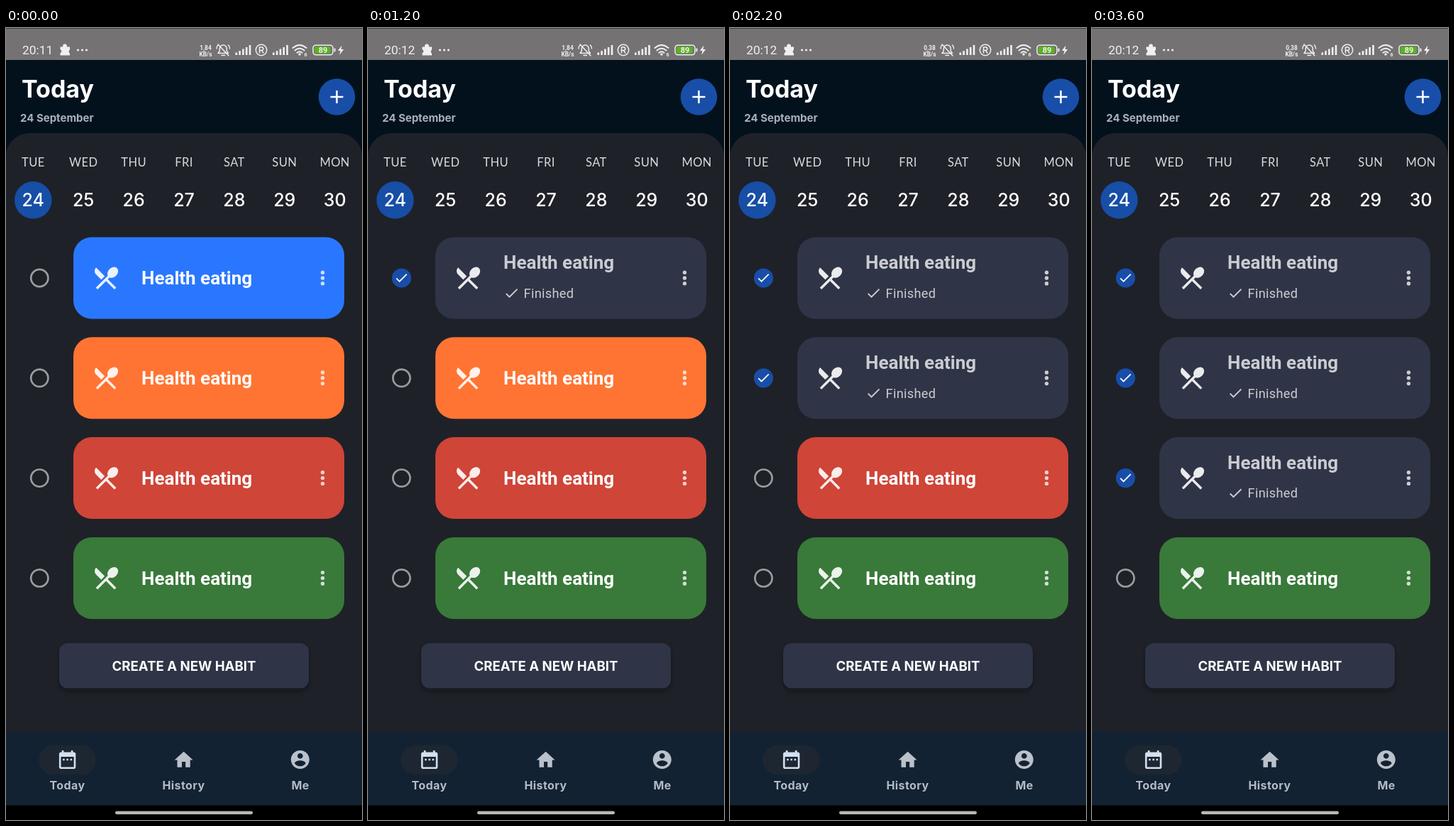
Animation of 502 by 1115 pixels, one loop 3700 ms. Source, as an HTML page:

```html
<!DOCTYPE html>
<html lang="en">
<head>
<meta charset="utf-8">
<title>Habits</title>
<style>
html, body { margin: 0; width: 100%; height: 100%; overflow: hidden; background: #000; }
svg { display: block; width: 100%; height: 100%; }
text { font-family: Inter, "Open Sans", sans-serif; fill: #fff; }
.mid { text-anchor: middle; }
.head { font-size: 34px; font-weight: 700; }
.date { font-size: 15px; font-weight: 700; fill: #a9b1bb; }
.day { font: 400 16.5px Lato, sans-serif; fill: #d9dadd; letter-spacing: .4px; }
.num { font-size: 25px; font-weight: 500; }
.title { font: 700 26px Roboto, sans-serif; }
.done { font: 400 18.2px Roboto, sans-serif; letter-spacing: .33px; }
.btn { font-size: 18.6px; font-weight: 700; }
.nav { font-size: 16px; font-weight: 700; letter-spacing: .4px; fill: #b4bbc4; }
.clock { font: 400 17.4px Roboto, sans-serif; fill: #f0f0f0; }
.rate { font: 700 8.4px Roboto, sans-serif; fill: #f0f0f0; }
</style>
</head>
<body>
<svg viewBox="0 0 502 1115" preserveAspectRatio="none">
  <defs>
    <path id="food" d="M8.1 13.34l2.83-2.83L3.91 3.5c-1.56 1.56-1.56 4.09 0 5.66l4.19 4.18zm6.78-1.81c1.53.71 3.68.21 5.27-1.38 1.91-1.91 2.28-4.65.81-6.12-1.46-1.46-4.2-1.1-6.12.81-1.59 1.59-2.09 3.74-1.38 5.27L3.7 19.87l1.41 1.41L12 14.41l6.88 6.88 1.41-1.41L13.41 13z"/>
    <path id="tick" d="M9 16.17 4.83 12l-1.42 1.41L9 19 21 7l-1.41-1.41z"/>
    <path id="bars" d="M0 14v-3.5h2.6V14zM4.8 14V8.2h2.6V14zM9.6 14V5.6h2.6V14zM14.4 14V3h2.6v11zM19.2 14V0h2.6v14z"/>
    <filter id="soft" x="-10%" y="-30%" width="120%" height="180%"><feGaussianBlur stdDeviation="3"/></filter>
  </defs>

  <rect width="502" height="1115" fill="#03111d"/>
  <rect width="502" height="45" fill="#757273"/>
  <rect width="502" height="1" fill="#3c3a3b"/>

  <g fill="#f0f0f0">
    <text id="clock" class="clock" x="23" y="37.3">20:11</text>
    <path d="M76.500 26.500h3.700a3 3 0 1 1 5.600 0h4.200v4.200a3 3 0 0 0 0 5v2.800H76.500v-3.200a2.600 2.600 0 0 0 0-5z"/>
    <circle cx="101.500" cy="31" r="1.600"/><circle cx="107.500" cy="31" r="1.600"/><circle cx="113.500" cy="31" r="1.600"/>
    <text id="rate" class="rate mid" x="281.500" y="31">1,84</text>
    <text class="rate mid" x="281.500" y="39.500">KB/s</text>
    <g fill="none" stroke="#f0f0f0" stroke-width="1.500" stroke-linecap="round" stroke-linejoin="round">
      <path d="M299 35.500h14.500l-2.200-3v-3.500a5 5 0 0 0-10 0v3.500zM304 38.500h4.500M299 23l15 16M297 29q0-3 2-5M315.500 29q0-3-2-5"/>
      <circle cx="360" cy="31" r="7.700"/>
      <path d="M357.500 35v-8h3a2.200 2.200 0 0 1 0 4.500h-3m3 0 2.300 3.500"/>
      <path stroke-width="2" d="M404.500 28q9.500-8 19 0M407.500 31.500q6.500-5.500 13 0M410.500 34.800q3.500-3 7 0"/>
      <rect x="433" y="24.200" width="28" height="13.600" rx="4"/>
    </g>
    <circle cx="414" cy="37" r="1.800"/>
    <text class="rate" x="420.500" y="40" style="font-size:7px">6</text>
    <use href="#bars" x="323.500" y="24"/><use href="#bars" x="376" y="24"/>
    <rect x="435" y="26.200" width="22.500" height="9.600" rx="2" fill="#58b51c"/>
    <text class="rate mid" x="447" y="35" style="font-size:11px">89</text>
    <rect x="462.500" y="28.500" width="2" height="5" rx="1"/>
    <path d="M473.500 24.500 468 32h3.600l-1.400 6 6-8h-3.700z"/>
  </g>

  <text class="head" x="22" y="97.500">Today</text>
  <text class="date" x="20" y="132">24 September</text>
  <circle cx="466.500" cy="97" r="25.800" fill="#184ea8"/>
  <path d="M457.500 97h18M466.500 88v18" stroke="#fff" stroke-width="2.500"/>

  <path d="M0 991V181a33 33 0 0 1 33-33h436a33 33 0 0 1 33 33v810z" fill="#1f2129"/>
  <circle cx="38.300" cy="242.300" r="26.300" fill="#174ea6"/>
  <g id="week"></g>
  <g id="list"></g>

  <rect x="76" y="870" width="350" height="63" rx="12" fill="#0b0c10" opacity=".55" filter="url(#soft)"/>
  <rect x="75" y="866" width="352" height="63.500" rx="12" fill="#2f3547"/>
  <text class="btn mid" x="251" y="904.700">CREATE A NEW HABIT</text>

  <rect y="991" width="502" height="103.500" fill="#122232"/>
  <rect x="46" y="1010" width="81" height="41" rx="20.500" fill="#1d2631"/>
  <g fill="#bbc1ca">
    <path transform="translate(71 1014.400) scale(1.300)" fill="#d3e0f0" d="M9 11H7v2h2v-2zm4 0h-2v2h2v-2zm4 0h-2v2h2v-2zm2-7h-1V2h-2v2H8V2H6v2H5c-1.110 0-1.990.9-1.990 2L3 20c0 1.100.89 2 2 2h14c1.100 0 2-.9 2-2V6c0-1.100-.9-2-2-2zm0 16H5V9h14v11z"/>
    <path transform="translate(235 1014.800) scale(1.300)" d="M10 20v-6h4v6h5v-8h3L12 3 2 12h3v8z"/>
    <path transform="translate(399.200 1014.400) scale(1.300)" d="M12 2C6.480 2 2 6.480 2 12s4.480 10 10 10 10-4.480 10-10S17.520 2 12 2zm0 3c1.660 0 3 1.340 3 3s-1.340 3-3 3-3-1.340-3-3 1.340-3 3-3zm0 14.200c-2.500 0-4.710-1.280-6-3.220.03-1.990 4-3.080 6-3.080 1.990 0 5.970 1.090 6 3.080-1.290 1.940-3.500 3.220-6 3.220z"/>
  </g>
  <text class="nav mid" x="86.500" y="1072">Today</text>
  <text class="nav mid" x="250.500" y="1072">History</text>
  <text class="nav mid" x="415" y="1072">Me</text>

  <rect y="1094.500" width="502" height="21" fill="#000"/>
  <rect x="154" y="1102.500" width="194" height="4.600" rx="2.300" fill="#b9b9b9"/>
</svg>
<script>
const LOOP = 3700, STEP = 100;
const CLOCK_AT = 700, RATE_AT = 2100;
const GREY = [47, 53, 71];
const ROW_H = 31, GAP = 13; // expanding line and the space above it

// check: moment of ticking; touch: finger offset from the ring; glow: ring fill while held
const habits = [
  { color: [42, 119, 255], check: 570, touch: [-4, 5], glow: .28 },
  { color: [255, 116, 51], check: 1685, touch: [3, 3], glow: .15 },
  { color: [207, 69, 56], check: 2865, touch: [4, 2], glow: .06 },
  { color: [57, 121, 58], check: Infinity, touch: [0, 0], glow: 0 }
];

const byId = id => document.getElementById(id);
const clamp = x => Math.max(0, Math.min(1, x));
const mix = (a, b, k) => a + (b - a) * k;
// critically damped spring, s in seconds
const spring = (s, w) => s <= 0 ? 0 : 1 - (1 + w * s) * Math.exp(-w * s);
const set = (el, attrs) => { for (const k in attrs) el.setAttribute(k, attrs[k]); };

byId('week').innerHTML = ['TUE', 'WED', 'THU', 'FRI', 'SAT', 'SUN', 'MON'].map((d, i) => {
  const x = 38.3 + i * 70.9;
  return `<text class="day mid" x="${x}" y="194.800">${d}</text><text class="num mid" x="${x}" y="251.400">${24 + i}</text>`;
}).join('');

byId('list').innerHTML = habits.map((h, i) => `
  <g transform="translate(0 ${352 + i * 140.8})">
    <circle class="ripple" fill="#fff"/>
    <circle class="ring" cx="47.300" fill="#fff" stroke="#9b9ca1"/>
    <g class="badge">
      <circle r="13.600" fill="#184ea8"/>
      <use href="#tick" fill="#fff" transform="scale(.9) translate(-12.200 -12.300)"/>
    </g>
    <rect class="card" x="95" y="-57.500" width="382" height="115" rx="26"/>
    <use href="#food" fill="#fff" opacity=".9" transform="translate(120.300 -20.800) scale(1.730)"/>
    <g fill="#fff" opacity=".76">${[-7.8, 0, 7.8].map(y => `<circle cx="446.500" cy="${y}" r="2.700"/>`).join('')}</g>
    <text class="title" x="191" y="9.300">Health eating</text>
    <clipPath id="clip${i}"><rect x="185" width="200"/></clipPath>
    <g class="line" clip-path="url(#clip${i})">
      <g class="inner" fill="#fff">
        <use href="#tick" transform="translate(190.700 -12) scale(.975)"/>
        <text class="done" x="219.500" y="6.300">Finished</text>
      </g>
    </g>
  </g>`).join('');

[...byId('list').children].forEach((row, i) => {
  for (const name of ['ripple', 'ring', 'badge', 'card', 'title', 'line', 'inner'])
    habits[i][name] = row.querySelector('.' + name);
  habits[i].clip = row.querySelector('clipPath rect');
});

function drawHabit(h, t) {
  const s = (t - h.check) / 1000;
  const on = s >= 0;
  const tint = spring(s, 38.7), grow = spring(s, 20);
  const hold = clamp((s + .1) / .04);

  // ring, touch ripple and tick
  const [dx, dy] = h.touch;
  const slide = clamp((s + .1) / .2);
  set(h.ripple, {
    cx: 47.3 + mix(dx, 0, slide), cy: mix(dy, 0, slide),
    r: mix(10.5, 15, slide), opacity: .15 * hold * clamp(1 - s / .15)
  });
  set(h.ring, {
    r: mix(12.1, 9.2, hold), 'stroke-width': mix(2.7, 1.9, hold),
    'fill-opacity': h.glow * hold, opacity: on ? 0 : 1
  });
  set(h.badge, {
    transform: `translate(47.300 0) scale(${mix(.72, 1, clamp(s / .08))})`,
    opacity: on ? 1 : 0
  });

  // card
  const rgb = h.color.map((c, k) => Math.round(mix(c, GREY[k], tint)));
  set(h.card, { fill: `rgb(${rgb})` });
  const height = ROW_H * grow;
  const half = on ? (GAP + height) / 2 : 0;
  const bottom = 15 + half;
  set(h.title, { transform: `translate(0 ${-half})`, 'fill-opacity': mix(1, .75, tint) });
  set(h.clip, { y: bottom - height, height });
  set(h.line, { opacity: .75 * grow });
  set(h.inner, { transform: `translate(0 ${bottom - ROW_H / 2})` });
}

function draw(t) {
  byId('clock').textContent = t < CLOCK_AT ? '20:11' : '20:12';
  byId('rate').textContent = t < RATE_AT ? '1,84' : '0,38';
  habits.forEach(h => drawHabit(h, t));
}

const start = performance.now();
function tick() {
  const t = (performance.now() - start) % LOOP;
  draw(Math.floor(t / STEP) * STEP);
  requestAnimationFrame(tick);
}
tick();
</script>
</body>
</html>
```
